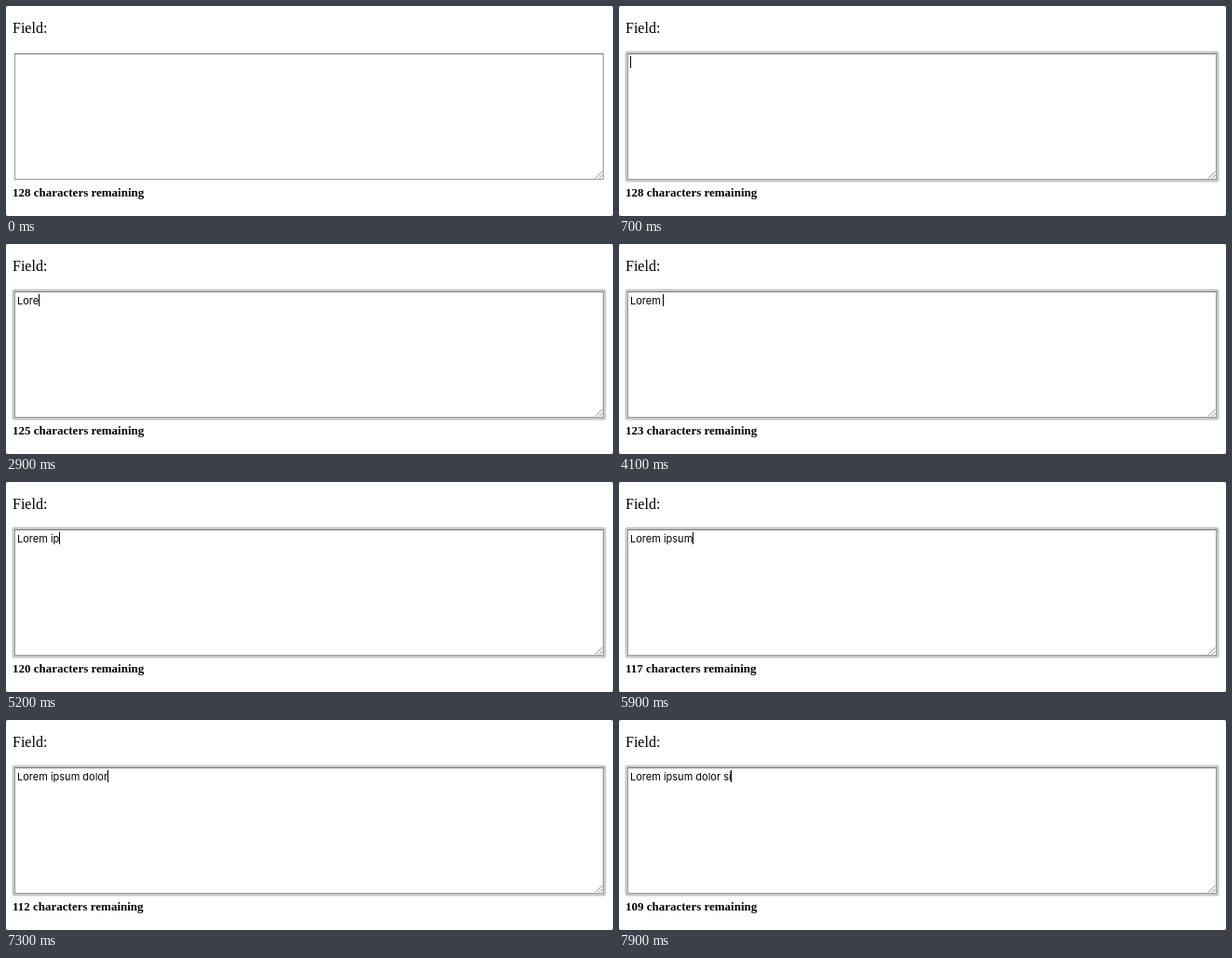
Animation of 652 by 226 pixels, one loop 8 s. Source, as an HTML page:

```html
<!DOCTYPE html>
<html lang="en">
<head>
<meta charset="utf-8">
<title>Character counter</title>
<style>
  html, body { margin: 0; width: 100%; height: 100%; overflow: hidden; background: #666; }
  svg { display: block; }
  text { white-space: pre; }
  .serif { font: 16px "Liberation Serif", serif; }
  #count { font-weight: bold; font-size: 13px; }
  #typed { font: 11px Inter, sans-serif; }
</style>
</head>
<body>
<svg width="652" height="226" viewBox="0 0 652 226">
  <rect width="652" height="226" rx="2" fill="#fff"/>
  <text class="serif" x="7" y="29">Field:</text>
  <rect id="ring" x="6.5" y="48.5" width="638" height="141" rx="2.5" fill="#c8c8c8"/>
  <rect x="9.5" y="51.5" width="632" height="135" fill="#fff" stroke="#999"/>
  <path d="M9 51.5H642" stroke="#767676"/>
  <path d="M633 185.5L640.5 178M637 185.5L640.5 182" stroke="#777" stroke-width=".9"/>
  <text id="typed" x="12" y="65"></text>
  <rect id="caret" y="54" width="1" height="13"/>
  <text id="count" class="serif" x="7" y="205"></text>
</svg>
<script>
const LOOP = 8000, FOCUS = 700, LIMIT = 128;
const message = "Lorem ipsum dolor si";
// Key press and release times, in tenths of a second
const presses = [17, 22, 23, 29, 30, 41, 45, 51, 55, 57, 58, 61, 64, 66, 67, 71, 73, 76, 78, 79];
const releases = [18, 23, 24, 30, 31, 43, 46, 52, 55, 58, 59, 62, 65, 67, 68, 72, 74, 77, 79];
const caretOff = [[12, 17], [35, 39], [50, 51]];

const [ring, typed, caret, count] =
  ["ring", "typed", "caret", "count"].map(id => document.getElementById(id));
const passed = (times, t) => times.filter(x => x * 100 <= t).length;
const show = (el, on) => el.setAttribute("visibility", on ? "visible" : "hidden");

function draw() {
  const t = performance.now() % LOOP;
  const focused = t >= FOCUS;
  const blinked = caretOff.some(([a, b]) => t >= a * 100 && t < b * 100);
  typed.textContent = message.slice(0, passed(presses, t));
  count.textContent = `${LIMIT - passed(releases, t)} characters remaining`;
  caret.setAttribute("x", Math.floor(12 + typed.getComputedTextLength()));
  show(ring, focused);
  show(caret, focused && !blinked);
  requestAnimationFrame(draw);
}
draw();
</script>
</body>
</html>
```
